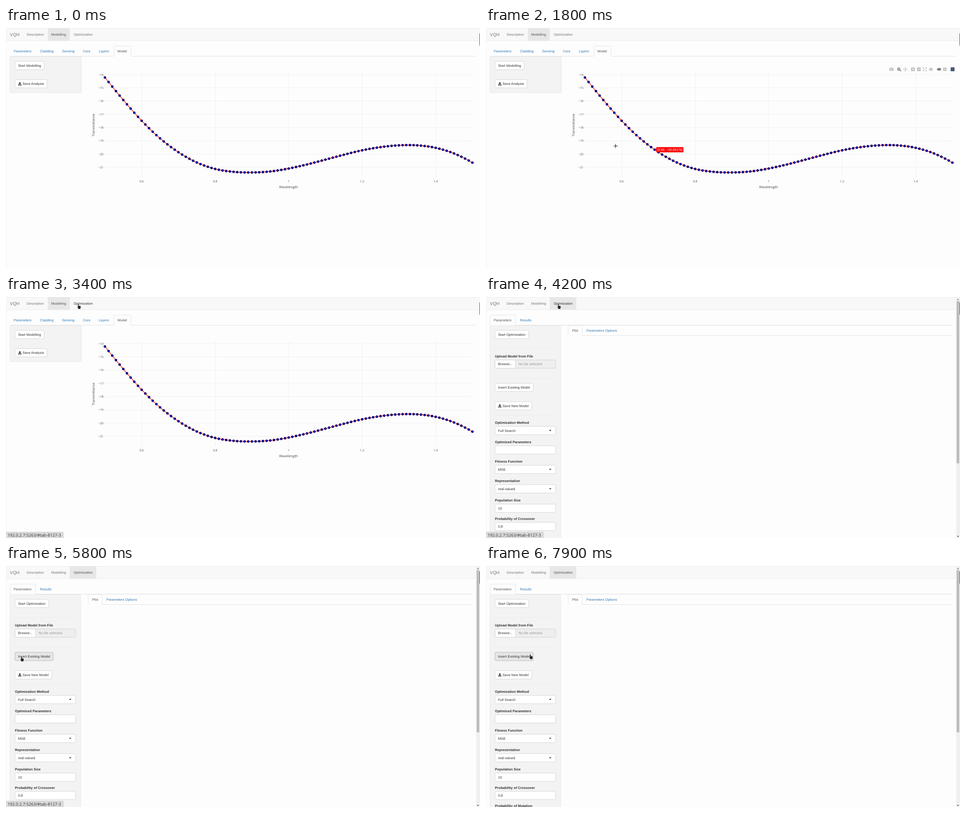
Write an HTML page with a canvas that moves like this. It is 1048 px wide and 534 px high and loops after 8000 ms.

```html
<!DOCTYPE html>
<html lang="en">
<head>
<meta charset="utf-8">
<title>Modelling and optimization</title>
<style>
html, body { margin: 0; width: 100%; height: 100%; overflow: hidden; background: #fdfdfd; }
canvas { display: block; }
</style>
</head>
<body>
<canvas id="stage" width="1048" height="534"></canvas>
<script>
const ctx = document.getElementById('stage').getContext('2d');
ctx.textRendering = 'geometricPrecision';

const LOOP = 8000, STEP = 100;
const TAB_SWITCH = 3900, STATUS = [2900, 7500], HOVER_LABEL = [1700, 1900];
const SANS = '"Liberation Sans", Arial, sans-serif', OPEN = '"Open Sans", sans-serif';
const PAGE = '#fdfdfd', LINK = '#337ab7', TEXT = '#333', GREY = '#777';

// Pointer path: time, x, y
const POINTER = [
  [600, 900, 150], [1000, 800, 205], [1700, 373, 267], [1800, 286.5, 261.5],
  [2300, 185, 130], [2900, 160, 16], [4500, 160, 16], [5300, 34, 201],
  [6400, 34, 201], [7200, 55, 166], [7400, 55, 166], [7800, 98, 196], [8000, 98, 196]
];

// Curve heights in pixels at every 0.05 of wavelength
const HEIGHTS = [109.7, 159.5, 205.5, 244.5, 275.2, 298, 312.3, 318.7, 320.1, 317.9, 311.4,
  302.3, 291.7, 280.9, 271, 264, 260, 260, 265.5, 278, 298.3];

function text(s, x, y, { color = TEXT, size = 7.64, font = SANS, weight = '', align = 'left' } = {}) {
  ctx.font = `${weight} ${size}px ${font}`;
  ctx.textAlign = align;
  ctx.fillStyle = color;
  ctx.fillText(s, x, y + size * 0.36);
}

function rect(x, y, w, h, color) {
  ctx.fillStyle = color;
  ctx.fillRect(x, y, w, h);
}

function line(points, color, width = 1) {
  ctx.beginPath();
  points.forEach(([x, y]) => ctx.lineTo(x, y));
  ctx.strokeStyle = color;
  ctx.lineWidth = width;
  ctx.stroke();
}

function poly(points, color, outline) {
  ctx.beginPath();
  points.forEach(([x, y]) => ctx.lineTo(x, y));
  ctx.closePath();
  if (outline) {
    ctx.strokeStyle = outline;
    ctx.lineWidth = 1;
    ctx.stroke();
  }
  ctx.fillStyle = color;
  ctx.fill();
}

function box(x, y, w, h, fill = '#fff', border = '#ccc', radius = 2.2) {
  ctx.beginPath();
  ctx.roundRect(x, y, w, h, radius);
  ctx.fillStyle = fill;
  ctx.fill();
  ctx.strokeStyle = border;
  ctx.lineWidth = 0.8;
  ctx.stroke();
}

function button(label, y, w, { icon = false, hover = false } = {}) {
  box(19.9, y, w, 18.4, hover ? '#e6e6e6' : '#fff', hover ? '#adadad' : '#ccc');
  const mid = y + 9.2;
  if (icon) {
    rect(29.3, mid - 3.6, 2.4, 3.2, TEXT);
    poly([[27.5, mid - 0.8], [33.5, mid - 0.8], [30.5, mid + 2.2]], TEXT);
    line([[27.5, mid + 1.2], [27.5, mid + 3], [33.5, mid + 3], [33.5, mid + 1.2]], TEXT, 1.3);
  }
  text(label, icon ? 36.5 : 26.7, mid);
}

function field(label, y, value, select) {
  text(label, 19.7, y, { weight: 'bold' });
  box(19.9, y + 8.2, 134, 18.4);
  text(value, 26.7, y + 17.5);
  if (select) poly([[139.4, y + 16.1], [144.6, y + 16.1], [142, y + 18.9]], TEXT);
}

// Tabs are [label, text x]; the active one is outlined from left to right
function tabs(items, active, [left, right], y, lineStart, lineEnd) {
  const base = y + 11.5;
  line([[lineStart, base], [lineEnd, base]], '#ddd', 0.8);
  box(left, y - 11, right - left, 25, PAGE, '#ddd');
  rect(left - 1, base + 0.4, right - left + 2, 4, PAGE);
  items.forEach(([label, x], i) => text(label, x, y, { color: i === active ? '#555' : LINK }));
}

function navbar(optimizing, hovered) {
  rect(0, 0, 1048, 28, '#f8f8f8');
  line([[0, 28.3], [1048, 28.3]], '#e7e7e7', 0.8);
  line([[0, 0.3], [1048, 0.3]], '#e4e4e4', 0.7);
  line([[0.3, 0], [0.3, 534]], '#e7e7e7', 0.7);
  if (optimizing) rect(141, 0.5, 58.5, 27.5, '#e7e7e7');
  else rect(92.5, 0.5, 48.5, 27.5, '#e7e7e7');
  text('VQH', 8.6, 14.5, { color: GREY, size: 9.83 });
  text('Description', 45.7, 14.7, { color: GREY });
  text('Modelling', 100, 14.7, { color: optimizing ? GREY : '#555' });
  text('Optimization', 149.4, 14.7, { color: hovered ? TEXT : optimizing ? '#555' : GREY });
}

const plotX = w => 218.7 + (w - 0.5) * 812.5;
const plotY = v => 103.3 - (v + 14) * 29.32;

function curveY(i) {
  const n = Math.min(Math.floor(i / 5), HEIGHTS.length - 2), u = i / 5 - n;
  const b = HEIGHTS[n], c = HEIGHTS[n + 1];
  const a = HEIGHTS[n - 1] ?? 2 * b - c, d = HEIGHTS[n + 2] ?? 2 * c - b + 7;
  return b + u / 2 * (c - a + u * (2 * a - 5 * b + 4 * c - d + u * (3 * (b - c) + d - a)));
}

const curve = Array.from({ length: 101 }, (_, i) => [plotX(0.5 + i / 100), curveY(i)]);

function chart() {
  const tick = { color: '#444', size: 6.55, font: OPEN };
  const title = { color: '#444', size: 7.64, font: OPEN, align: 'center' };
  for (let v = -14; v >= -21; v--) {
    line([[218, plotY(v)], [1035, plotY(v)]], '#eee', 0.8);
    text('\u2212' + -v, 215.5, plotY(v), { ...tick, align: 'right' });
  }
  for (const w of [0.6, 0.8, 1, 1.2, 1.4]) {
    line([[plotX(w), 98], [plotX(w), 332]], '#eee', 0.8);
    text(w, plotX(w), 340, { ...tick, align: 'center' });
  }
  text('Wavelength', 624.7, 352, title);
  ctx.save();
  ctx.translate(192.8, 215);
  ctx.rotate(-Math.PI / 2);
  text('Transmittance', 0, 0, title);
  ctx.restore();

  line(curve, '#f00', 1.2);
  for (const [x, y] of curve) {
    ctx.beginPath();
    ctx.arc(x, y, 2.4, 0, 7);
    ctx.fillStyle = '#0000c8';
    ctx.fill();
    ctx.strokeStyle = '#000030';
    ctx.lineWidth = 1;
    ctx.stroke();
  }
}

function toolbar() {
  const pale = '#bdbdbd', dark = '#7c7c7c', y = 91.5;
  const ring = (x, r, color, width) => {
    ctx.beginPath();
    ctx.arc(x, y, r, 0, 7);
    ctx.strokeStyle = color;
    ctx.lineWidth = width;
    ctx.stroke();
  };
  rect(892, y - 2.7, 9, 6, pale);
  rect(894.5, y - 3.7, 4, 2, pale);
  ring(896.5, 1.6, PAGE, 1);

  ctx.save();
  ctx.translate(-0.8, -0.6);
  ring(913.5, 2.8, dark, 1.4);
  line([[915.6, y + 2], [918.4, y + 4.8]], dark, 1.7);
  line([[912, y], [915, y]], dark);
  line([[913.5, y - 1.5], [913.5, y + 1.5]], dark);
  ctx.restore();

  line([[922.5, y], [931.5, y]], pale);
  line([[927, y - 4.5], [927, y + 4.5]], pale);
  for (const [dx, dy] of [[1, 0], [-1, 0], [0, 1], [0, -1]]) {
    const tip = s => [927 + dx * 3 + dy * s, y + dy * 3 + dx * s];
    poly([[927 + dx * 5, y + dy * 5], tip(1.7), tip(-1.7)], pale);
  }
  for (const x of [944, 957]) {
    rect(x - 4, y - 4, 8, 8, pale);
    line([[x - 2.3, y], [x + 2.3, y]], PAGE, 1.2);
  }
  line([[944, y - 2.3], [944, y + 2.3]], PAGE, 1.2);

  for (const sx of [-1, 1]) for (const sy of [-1, 1]) {
    const at = (a, b) => [970.3 + sx * a, y + sy * b];
    line([at(1, 1), at(3, 3)], pale, 1.2);
    line([at(1.8, 4), at(4, 4), at(4, 1.8)], pale);
  }
  poly([[979, y], [983.7, y - 4], [988.4, y], [987, y], [987, y + 3.7],
    [984.7, y + 3.7], [984.7, y + 1], [982.7, y + 1], [982.7, y + 3.7], [980.4, y + 3.7], [980.4, y]], pale);
  poly([[996.5, y], [999.3, y - 2.7], [1005.7, y - 2.7], [1005.7, y + 2.7], [999.3, y + 2.7]], dark);
  rect(1010.3, y - 3.4, 8.4, 2.9, pale);
  rect(1010.3, y + 0.6, 8.4, 2.9, pale);
  rect(1027.3, y - 4.3, 8.6, 8.6, '#465777');
}

function hoverLabel() {
  const [x, y] = curve[19];
  poly([[x + 1, y], [x + 4, y - 3], [x + 4, y - 5.4], [x + 63, y - 5.4],
    [x + 63, y + 5.4], [x + 4, y + 5.4], [x + 4, y + 3]], '#f00', '#d33');
  text('(0.69, \u221219.68176)', x + 5.3, y + 0.2, { color: '#fff', size: 7.1 });
}

function modelling() {
  tabs([['Parameters', 17], ['Cladding', 75.2], ['Sensing', 123.9], ['Core', 170], ['Layers', 205], ['Model', 246.6]],
    5, [238.5, 276], 51, 8.7, 1039);
  box(8.9, 63.2, 157.7, 80, '#f3f3f3', '#e3e3e3');
  button('Start Modelling', 73.8, 64.5);
  button('Save Analysis', 114.4, 70.8, { icon: true });
  chart();
}

function optimization(hovered) {
  tabs([['Parameters', 17], ['Results', 75.2]], 0, [8.9, 65.4], 51, 8.7, 1030.5);
  tabs([['Plot', 190.4], ['Parameters Options', 222]], 0, [181.6, 212.6], 74, 181.3, 1030.5);
  line([[8.7, 62.5], [1030.5, 62.5]], '#ddd', 0.8);
  rect(9.4, 61.9, 55.5, 1.2, PAGE);
  box(8.9, 63.2, 156, 490, '#f3f3f3', '#e3e3e3');
  for (const y of [114, 180, 262]) line([[20, y], [154, y]], '#eaeaea', 0.8);

  button('Start Optimization', 73.8, 74.3);
  text('Upload Model from File', 19.7, 131.2, { weight: 'bold' });
  box(19.9, 139.5, 134, 18.4, '#eee');
  button('Browse...', 139.5, 45.3);
  text('No file selected', 72, 148.7, { color: '#999' });
  button('Insert Existing Model', 191.2, 84.4, { hover: hovered });
  button('Save New Model', 232, 81.2, { icon: true });
  field('Optimization Method', 278.5, 'Full Search', true);
  field('Optimized Parameters', 321.5, '');
  field('Fitness Function', 364.6, 'MSE', true);
  field('Representation', 407.6, 'real-valued', true);
  field('Population Size', 450.6, '10');
  field('Probability of Crossover', 491, '0,8');
  field('Probability of Mutation', 531.2, '');

  rect(1039.5, 0, 8.5, 534, '#f0f0f0');
  rect(1040.5, 9, 5.8, 359.5, '#bcbcbc');
  poly([[1041.2, 6.5], [1045.8, 6.5], [1043.5, 4]], '#777');
  poly([[1041.2, 529.5], [1045.8, 529.5], [1043.5, 532]], '#444');
}

function statusBar() {
  rect(0, 521, 126.7, 13, '#dadada');
  line([[0, 521], [126.7, 521], [126.7, 534]], '#c4c4c4', 0.8);
  text('192.0.2.7:5263/#tab-8127-3', 3.6, 528, { size: 9.2, font: OPEN });
}

function pointerAt(t) {
  const next = POINTER.findIndex(key => key[0] > t);
  if (next < 1) return null;
  const [t0, x0, y0] = POINTER[next - 1], [t1, x1, y1] = POINTER[next];
  const u = (t - t0) / (t1 - t0);
  return { x: x0 + (x1 - x0) * u, y: y0 + (y1 - y0) * u };
}

const inside = (p, x0, y0, x1, y1) => !!p && p.x >= x0 && p.x <= x1 && p.y >= y0 && p.y <= y1;

function drawPointer({ x, y }, kind) {
  ctx.save();
  ctx.translate(x, y);
  if (kind === 'cross') {
    for (const [color, width, arm] of [['#fff', 2.6, 5.2], ['#222', 1.1, 4.6]]) {
      line([[-arm, 0], [arm, 0]], color, width);
      line([[0, -arm], [0, arm]], color, width);
    }
  } else if (kind === 'hand') {
    poly([[-0.7, 0], [0.8, 0], [1, 3.4], [4.6, 4.2], [5.2, 5.4], [4.6, 8.4], [4.2, 10.2],
      [0, 10.2], [-1.4, 7.6], [-1.8, 5.2], [-0.5, 5.8]], '#222', '#ddd');
  } else {
    poly([[0, 0], [0, 7.6], [1.7, 6.2], [3, 9.2], [4.2, 8.6], [2.9, 5.8], [5, 5.5]], '#222', '#ddd');
  }
  ctx.restore();
}

function draw(t) {
  const during = ([from, to]) => t >= from && t < to;
  const optimizing = t >= TAB_SWITCH;
  const pointer = pointerAt(t);
  const overNav = inside(pointer, 141, 0, 199, 28);
  const overInsert = optimizing && inside(pointer, 20, 191, 104, 209);
  const overPlot = !optimizing && inside(pointer, 218, 98, 1035, 332);

  rect(0, 0, 1048, 534, PAGE);
  navbar(optimizing, overNav);
  if (optimizing) optimization(overInsert);
  else modelling();
  if (overPlot) toolbar();
  if (during(HOVER_LABEL)) hoverLabel();
  rect(1047, 12, 1, 27, '#555');
  if (during(STATUS)) statusBar();
  if (pointer) drawPointer(pointer, overPlot ? 'cross' : overNav || overInsert ? 'hand' : 'arrow');
}

const start = performance.now();
function tick() {
  const t = (performance.now() - start) % LOOP;
  draw(Math.floor(t / STEP) * STEP);
  requestAnimationFrame(tick);
}
tick();
</script>
</body>
</html>
```
